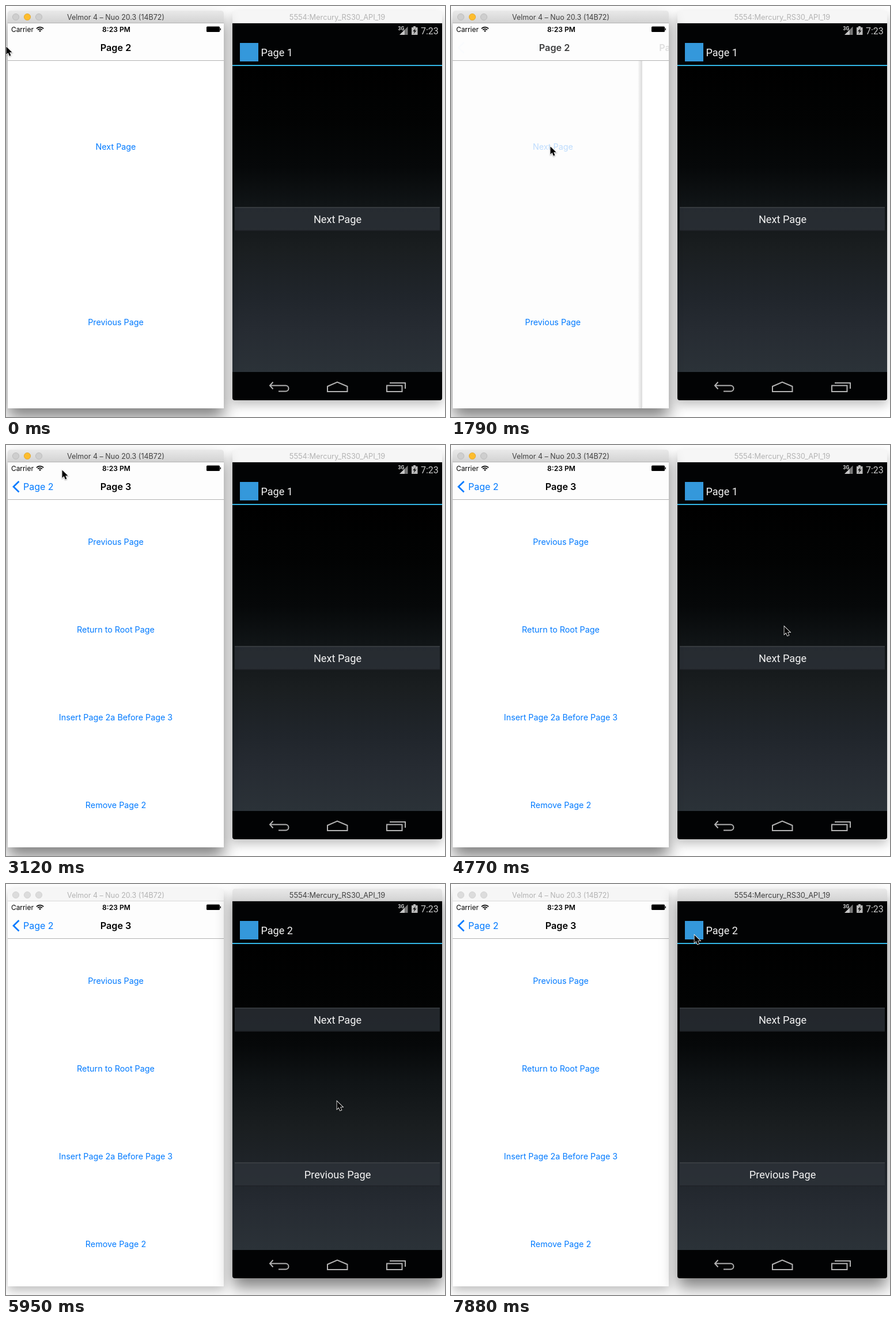
These frames come from a looping animation (762x712 px, 8 s). An HTML page with a canvas:

```html
<!DOCTYPE html>
<html lang="en">
<head>
<meta charset="utf-8">
<title>Page navigation</title>
<style>
  html, body { margin: 0; width: 100%; height: 100%; overflow: hidden; background: #fff; }
  canvas { display: block; }
</style>
</head>
<body>
<canvas id="stage" width="762" height="712"></canvas>
<script>
const ctx = document.getElementById('stage').getContext('2d');
const LOOP = 8000, STEP = 148.7;
const IOS = 'Inter, sans-serif', DROID = 'Roboto, sans-serif', BLUE = '#007aff';

// Steps at which something switches
const TAP = 11, PUSH = 12, FOCUS = 37, PRESS = 38, PAGE_2 = 40;

// Pointer stops: step, x, y
const STOPS = [
  [0, 0, 70], [1, 20, 37], [2, 45, 75], [3, 61, 115], [5, 61, 115], [11, 172, 243],
  [14, 172, 243], [21, 97, 43], [22, 97, 60], [23, 97, 91], [28, 97, 91],
  [31, 520, 350], [32, 578, 314], [33, 578, 314], [37, 574, 376], [42, 574, 376],
  [48, 382, 50], [50, 404, 58], [51, 410, 68], [53, 422, 88]
];

function rect(x, y, w, h, fill) {
  ctx.fillStyle = fill;
  ctx.fillRect(x, y, w, h);
}

function text(str, x, y, font, color, align = 'center', alpha = 1) {
  ctx.save();
  ctx.globalAlpha *= alpha;
  ctx.font = font;
  ctx.fillStyle = color;
  ctx.textAlign = align;
  ctx.fillText(str, x, y);
  ctx.restore();
}

function stroke(path, color, width) {
  ctx.strokeStyle = color;
  ctx.lineWidth = width;
  ctx.stroke(new Path2D(path));
}

function fill(path, color) {
  ctx.fillStyle = color;
  ctx.fill(new Path2D(path));
}

function gradient(x0, y0, x1, y1, stops) {
  const g = ctx.createLinearGradient(x0, y0, x1, y1);
  stops.forEach(([at, color]) => g.addColorStop(at, color));
  return g;
}

function clipped(x, y, w, h, paint) {
  ctx.save();
  ctx.beginPath();
  ctx.rect(x, y, w, h);
  ctx.clip();
  paint();
  ctx.restore();
}

function windowFrame(x, w, bottom, title, size, active) {
  ctx.save();
  ctx.shadowColor = active ? 'rgba(0,0,0,.5)' : 'rgba(0,0,0,.25)';
  ctx.shadowBlur = active ? 28 : 18;
  ctx.shadowOffsetY = active ? 16 : 8;
  ctx.fillStyle = active
    ? gradient(0, 8, 0, 30, [[0, '#e9e9e9'], [1, '#d2d2d2']])
    : '#f6f6f6';
  ctx.beginPath();
  ctx.roundRect(x, 8, w, bottom - 8, [5, 5, 3, 3]);
  ctx.fill();
  ctx.restore();
  rect(x, 29, w, 1, active ? '#b4b4b4' : '#dadada');
  text(title, x + w / 2, 24, `${size}px ${IOS}`, active ? '#404040' : '#b3b3b3');
}

function dot(x, color, edge) {
  ctx.beginPath();
  ctx.arc(x, 19, 5.6, 0, 7);
  ctx.fillStyle = color;
  ctx.fill();
  ctx.strokeStyle = edge;
  ctx.lineWidth = 0.8;
  ctx.stroke();
}

function link(label, x, y, alpha) {
  text(label, x, y + 5, `14.3px ${IOS}`, BLUE, 'center', alpha);
}

function iosStatus() {
  text('Carrier', 9, 45, `11.9px ${IOS}`, '#000', 'left');
  text('8:23 PM', 191.5, 45, `600 12.1px ${IOS}`, '#000');
  [[5.8, 1.7], [9, 1.7]].forEach(([r, width]) => {
    ctx.beginPath();
    ctx.arc(59, 45, r - 0.6, -Math.PI * 0.76, -Math.PI * 0.24);
    ctx.strokeStyle = '#000';
    ctx.lineWidth = width;
    ctx.stroke();
  });
  fill('M59 45L57 42.8Q59 41.4 61 42.8Z', '#000');
  ctx.fillStyle = '#000';
  ctx.beginPath();
  ctx.roundRect(348, 35.5, 23, 9.5, 1.5);
  ctx.fill();
  rect(371.6, 38.5, 1.4, 3.5, '#000');
}

// p runs from 0 (Page 2) to 1 (Page 3)
function iosPhone(step, active) {
  windowFrame(3, 375, 697, 'Velmor 4 – Nuo 20.3 (14B72)', 12.5, active);
  [17, 37, 57].forEach(x => {
    if (active && x === 37) dot(x, '#fdbd2e', '#dfa023');
    else dot(x, active ? '#cecece' : '#dcdcdc', active ? '#b6b6b6' : '#cdcdcd');
  });
  rect(3, 30, 375, 667, '#fff');

  const u = 0.6 + 2.85 * (step - PUSH);
  const p = step < PUSH ? 0 : 1 - (1 + u) * Math.exp(-u);

  clipped(3, 95, 375, 602, () => {
    const left = 190.5 - 112 * p;
    rect(3, 95, 375, 602, p ? '#fdfdfd' : '#fff');
    link('Next Page', left, 243.5, step >= TAP ? 0.25 : 1);
    link('Previous Page', left, 548);
    if (!p) return;
    const edge = Math.round(3 + 375 * (1 - p));
    rect(edge - 8, 95, 8, 602,
      gradient(edge - 8, 0, edge, 0, [[0, 'rgba(0,0,0,0)'], [0.5, 'rgba(0,0,0,.08)'], [1, 'rgba(0,0,0,.13)']]));
    rect(edge, 95, 375, 602, '#fff');
    ['Previous Page', 'Return to Root Page', 'Insert Page 2a Before Page 3', 'Remove Page 2']
      .forEach((label, i) => link(label, edge + 187.5, 167.5 + 152.2 * i));
  });

  clipped(3, 30, 375, 65, () => {
    rect(3, 30, 375, 64, '#fdfdfd');
    rect(3, 94, 375, 1, '#b2b2b2');
    iosStatus();
    const title = `600 16.2px ${IOS}`;
    text('Page 2', 190.5 - 90 * p, 78, title, '#000', 'center', Math.max(0, 1 - 2 * p));
    if (!p) return;
    text('Page 3', 190.5 + 225 * (1 - p), 78, title, '#000', 'center', p);
    ctx.globalAlpha = p * p;
    text('Page 2', 30 + 134 * (1 - p), 78, `16px ${IOS}`, BLUE, 'left');
    stroke('M22.5 63L13 72.2L22.5 81.5', BLUE, 2.7);
  });
}

function droidButton(label, y, pressed) {
  rect(397, y, 356, 41, pressed ? '#6b6d6e' : 'rgba(46,51,58,.75)');
  rect(397, y, 356, 1, pressed ? '#77797a' : '#4a4e52');
  rect(397, y + 40, 356, 1, pressed ? '#55585a' : '#1a1d21');
  text(label, 575.5, y + 27.5, `18.2px ${DROID}`, '#f3f3f3');
}

function droidStatus() {
  fill('M683 50H692.5V40.5Z', '#c6c6c6');
  fill('M693 50V40L697.5 35.5V50Z', '#777');
  text('3G', 680.5, 42, `700 8.5px ${DROID}`, '#d6d6d6', 'left');
  fill('M704 37H707V35H711V37H714.5V50H704Z', '#b9b9b9');
  fill('M711 38.5L706 44H709L707.5 48.5L712.5 42.5H709.5Z', '#111');
  text('7:23', 720, 49, `16px ${DROID}`, '#c8c8c8', 'left');
}

function droidPhone(step, active) {
  windowFrame(393, 364, 683, '5554:Mercury_RS30_API_19', 12.8, active);
  rect(393, 30, 364, 72, '#020304');
  rect(393, 102, 364, 2, '#33b5e5');
  rect(393, 104, 364, 530, gradient(0, 104, 0, 634, [
    [0, '#000'], [0.18, '#020303'], [0.33, '#060809'], [0.45, '#101416'],
    [0.6, '#1a1e20'], [0.75, '#20252b'], [0.86, '#262b32'], [1, '#2b3238']
  ]));
  ctx.fillStyle = '#020304';
  ctx.beginPath();
  ctx.roundRect(393, 634, 364, 49, [0, 0, 4, 4]);
  ctx.fill();

  droidStatus();
  rect(406, 64, 32, 32, '#3498db');
  const second = step >= PAGE_2;
  text(second ? 'Page 2' : 'Page 1', 442.5, 86.5, `18px ${DROID}`, '#f3f3f3', 'left');
  if (second) {
    droidButton('Next Page', 214.5, false);
    droidButton('Previous Page', 482.5, false);
  } else {
    droidButton('Next Page', 348.5, step >= PRESS);
  }

  stroke('M463.5 651.5L458 657.5L463.5 663.5M458 657.5H485.5A5 5 0 0 1 485.5 667.5H473', '#b2b2b2', 2);
  stroke('M558 668V659L575 651.5L592.5 659V668Z', '#b2b2b2', 2);
  stroke('M661 657.5H687.5V668H661ZM666 653H693V663', '#b2b2b2', 2);
}

function pointerAt(step) {
  const i = Math.max(1, STOPS.findIndex(stop => stop[0] >= step));
  const [s0, x0, y0] = STOPS[i - 1], [s1, x1, y1] = STOPS[i];
  const k = (step - s0) / (s1 - s0), ease = k * k * (3 - 2 * k);
  return [Math.round(x0 + (x1 - x0) * ease), Math.round(y0 + (y1 - y0) * ease)];
}

function pointer(x, y) {
  ctx.save();
  ctx.translate(x + 0.5, y + 0.5);
  ctx.shadowColor = 'rgba(0,0,0,.35)';
  ctx.shadowBlur = 2;
  ctx.shadowOffsetY = 1;
  const arrow = 'M0 0V13.5L3.1 10.6L5.4 16L7.9 15L5.6 9.7H10Z';
  stroke(arrow, '#fff', 1.6);
  ctx.shadowColor = 'transparent';
  fill(arrow, '#000');
  ctx.restore();
}

function draw(now) {
  const step = Math.min(53, Math.floor((now % LOOP + 5) / STEP));
  rect(0, 0, 762, 712, '#fff');
  // The active window lies on top, so its shadow falls on the other one
  if (step < FOCUS) {
    droidPhone(step, false);
    iosPhone(step, true);
  } else {
    iosPhone(step, false);
    droidPhone(step, true);
  }
  pointer(...pointerAt(step));
}

const start = performance.now();
function tick() {
  draw(performance.now() - start);
  requestAnimationFrame(tick);
}
tick();
</script>
</body>
</html>
```
